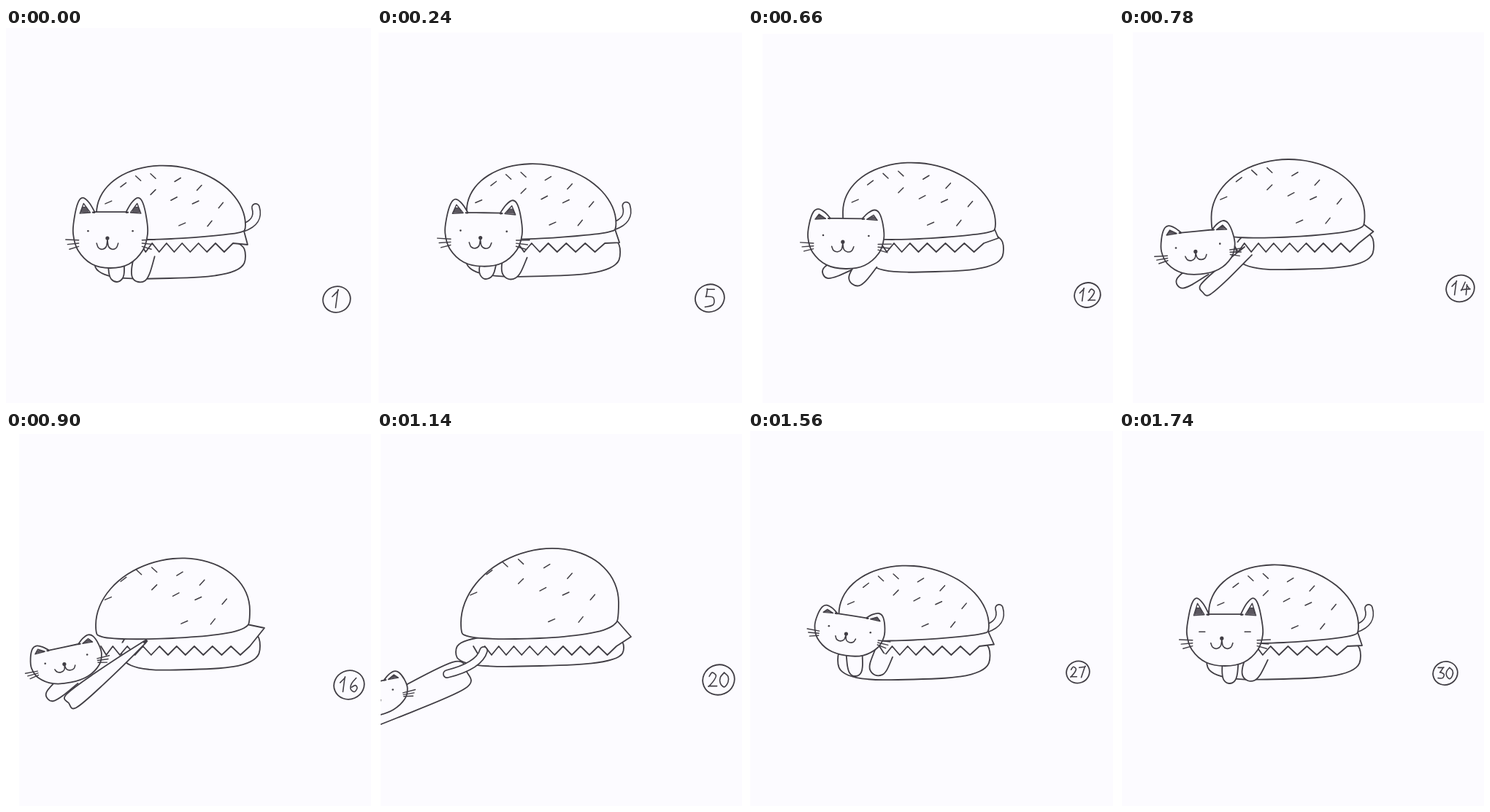
Write an HTML page with a canvas that moves like this. It is 500 px wide and 514 px high and loops after 1800 ms.

```html
<!DOCTYPE html>
<html lang="en">
<head>
<meta charset="utf-8">
<title>Cat burger</title>
<style>
html, body { margin: 0; width: 100%; height: 100%; overflow: hidden; background: #fff; }
canvas { display: block; width: 500px; height: 514px; }
</style>
</head>
<body>
<canvas id="stage" width="500" height="514"></canvas>
<script>
const ctx = document.getElementById('stage').getContext('2d');
const INK = '#413e45', PAPER = '#fcfbff', STEP = 60, COUNT = 30;
const LEAP = 20, RETURN = 24;

// bun: left, right, middle y, dome height, tilt, bottom y
// base: left, right, top, bottom    lettuce: left x, tip x, tip y
// head: x, y, half width, half height, tilt, ear height
// paw: end    arm: start, end, start width    badge: x, y, radius    paper: left, top
const poses = [
  { at: 1, bun: [124, 328, 262, 73, 8, 289], base: [121, 328, 288, 343], lettuce: [184, 331, 297],
    head: [143, 290, 51, 39, 0, 1.47], paw: [152, 348], arm: [190, 310, 181, 348, 14],
    tail: [1], badge: [453, 372, 19], paper: [0, 0] },
  { at: 8, bun: [122, 327, 257, 72, 9, 288], base: [122, 337, 275, 338], lettuce: [200, 333, 292],
    head: [148, 289, 54, 36, 2, 1.43], paw: [145, 341], arm: [190, 310, 179, 341, 18],
    tail: [1], badge: [458, 369, 21], paper: [4, 11] },
  { at: 12, bun: [130, 339, 260, 75, 8, 289], base: [163, 350, 278, 334], lettuce: [182, 343, 288],
    head: [134, 295, 52, 35, 1, 1.32], paw: [103, 338], arm: [166, 320, 143, 351, 13],
    tail: [0], badge: [465, 366, 18], paper: [20, 8] },
  { at: 16, bun: [123, 334, 256, 81, -10, 284], base: [158, 348, 268, 327], lettuce: [130, 354, 270],
    head: [84, 320, 49, 25, -12, 1.35], paw: [57, 367], arm: [188, 291, 86, 373, 2],
    tail: [0], badge: [470, 348, 21], paper: [18, 4] },
  { at: LEAP, bun: [115, 331, 249, 87, -14, 284], base: [108, 338, 278, 322], lettuce: [132, 348, 282],
    head: [-6, 368, 50, 23, -13, 1.35], paw: [-36, 425], arm: [112, 335, -40, 406, 20],
    tail: [0], badge: [468, 341, 22], paper: [5, 4] },
  { at: RETURN, bun: [126, 332, 260, 74, 7, 283], base: [126, 332, 280, 341], lettuce: [172, 341, 291],
    head: [131, 274, 44, 20, 18, 1], paw: [144, 326], arm: [182, 302, 172, 327, 11],
    tail: [1], badge: [457, 329, 15], paper: [2, 0] },
  { at: COUNT, bun: [123, 328, 258, 74, 9, 290], base: [120, 331, 282, 340], lettuce: [188, 333, 294],
    head: [145, 286, 52, 36, 0, 1.58], paw: [151, 346], arm: [190, 308, 176, 342, 15],
    tail: [1], badge: [447, 332, 17], paper: [4, 0] }
];

// Seeds in bun units: across from -1 to 1, down from 0 to 1.
const seeds = parse('-.64,.26 -.44,.17 -.24,.14 .09,.19 -.24,.36 .04,.45 .38,.3 .33,.5 .67,.54 .15,.8 .52,.79 -.84,.5');

// Handwritten digits in a box about 10 wide and 15 high.
const digits = [
  '5,0 1,5 1,11 5,15 9,10 9,4 5,0', '1,5 6,0 6,0 4,15', '1,4 4,0 8,3 6,8 1,14 1,14 9,14',
  '1,0 8,0 8,0 4,6 4,6 9,9 7,14 1,14', '5,0 1,9 1,9 10,8 10,8 7,4 7,4 6,15',
  '9,0 3,0 3,0 2,6 2,6 8,7 8,13 1,15', '7,0 2,6 1,12 5,15 8,11 6,8 2,10', '1,1 9,0 9,0 4,15',
  '5,7 2,4 4,0 8,2 7,6 2,10 3,15 7,15 8,11 5,7', '8,4 5,0 1,3 3,7 8,4 8,4 6,15'
].map(parse);

function parse(text) { return text.split(' ').map(p => p.split(',').map(Number)); }
function lerp(a, b, k) { return a + (b - a) * k; }
function range(n, fn) { return Array.from({ length: n }, (_, i) => fn(i)); }
function power(v, e) { return Math.sign(v) * Math.abs(v) ** e; }

function poseAt(n) {
  const i = poses.findLastIndex(p => p.at <= n);
  const a = poses[i], b = poses[i + 1] || a;
  const k = (n - a.at) / (b.at - a.at || 1), out = {};
  for (const key in a) if (key !== 'at') out[key] = a[key].map((v, j) => lerp(v, b[key][j], k));
  return out;
}

function ink(fill, width) {
  if (fill) { ctx.fillStyle = fill; ctx.fill(); }
  ctx.strokeStyle = INK;
  ctx.lineWidth = width;
  ctx.stroke();
}

function lines(pts, fill, width = 1.8) {
  ctx.beginPath();
  pts.forEach(p => ctx.lineTo(...p));
  ink(fill, width);
}

// A smooth curve through the points; a doubled point makes a corner.
function curve(pts, { closed = false, fill = '', width = 1.8 } = {}) {
  const n = pts.length;
  const at = i => pts[closed ? (i + n) % n : Math.max(0, Math.min(n - 1, i))];
  ctx.beginPath();
  ctx.moveTo(...pts[0]);
  for (let i = 0; i < (closed ? n : n - 1); i++) {
    const [p, q, r, s] = range(4, j => at(i + j - 1));
    ctx.bezierCurveTo(q[0] + (r[0] - p[0]) / 6, q[1] + (r[1] - p[1]) / 6,
      r[0] - (s[0] - q[0]) / 6, r[1] - (s[1] - q[1]) / 6, r[0], r[1]);
  }
  ink(fill, width);
}

function shifted(dx, dy, draw) {
  ctx.save();
  ctx.translate(dx, dy);
  draw();
  ctx.restore();
}

function dot([x, y], r) {
  ctx.beginPath();
  ctx.arc(x, y, r, 0, 7);
  ctx.fillStyle = INK;
  ctx.fill();
}

function drawTail(...path) {
  ctx.beginPath();
  ctx.moveTo(path[0], path[1]);
  ctx.quadraticCurveTo(...path.slice(2));
  ink('', 12);
  ctx.strokeStyle = PAPER;
  ctx.lineWidth = 8.6;
  ctx.stroke();
}

function drawBase([l, r, top, bottom]) {
  const cx = (l + r) / 2, cy = (top + bottom) / 2;
  curve(range(28, i => {
    const a = i / 28 * 2 * Math.PI, u = power(Math.cos(a), .6);
    return [cx + u * (r - l) / 2, cy + power(Math.sin(a), .7) * (bottom - top) / 2 - u * 3];
  }), { closed: true, fill: PAPER });
}

function drawLettuce([x, tipX, tipY], [, r, mid]) {
  const end = tipX - 20, teeth = Math.round((end - x) / 23);
  const zigzag = range(teeth * 2 + 1, i =>
    [lerp(x, end, (i / teeth / 2) ** 1.15), i % 2 ? 307 : 295]);
  lines([...zigzag, [tipX, tipY], [r - 4, mid + 9]], PAPER);
}

function drawBun([l, r, mid, h, tilt, bottom]) {
  const cx = (l + r) / 2, half = (r - l) / 2;
  curve(range(40, i => {
    const a = Math.PI + i / 40 * 2 * Math.PI, u = Math.cos(a), s = Math.sin(a);
    const side = mid + tilt * u;
    return [cx + u * half, s < 0 ? side + h * s : lerp(side, bottom - 5 * u, s ** .35)];
  }), { closed: true, fill: PAPER });

  const top = mid - h;
  seeds.forEach(([u, v], i) => {
    const leansRight = u < -.2 && v < .2;
    const a = leansRight ? .75 : -.65 + .25 * Math.sin(i * 3);
    const x = cx + u * half, y = lerp(top, bottom, v), dx = 4.8 * Math.cos(a), dy = 4.8 * Math.sin(a);
    lines([[x - dx, y - dy], [x + dx, y + dy]], '', 1.5);
  });
}

// A tapering limb with a round end; a whole one is round at both ends.
function drawLimb(x0, y0, x1, y1, w0, w1, whole) {
  const a = Math.atan2(y1 - y0, x1 - x0), c = Math.cos(a), s = Math.sin(a);
  const len = Math.hypot(x1 - x0, y1 - y0);
  const at = (along, side) => [x0 + c * along - s * side, y0 + s * along + c * side];
  const pts = [at(0, w0), at(len * .6, lerp(w0, w1, .6)), at(len - 4, w1 * .75), at(len, 0),
    at(len - 4, -w1 * .75), at(len * .6, -lerp(w0, w1, .6)), at(0, -w0)];
  if (whole) pts.push(at(-w0 * .6, 0));
  curve(pts, { closed: whole, fill: PAPER });
}

function drawHead([cx, cy, w, h, tilt, ear], n) {
  const a = tilt * Math.PI / 180, c = Math.cos(a), s = Math.sin(a);
  const put = ([x, y]) => [cx + x * w * c - y * h * s, cy + x * w * s + y * h * c];
  const mirror = pts => pts.map(([x, y]) => [-x, y]).reverse();
  const slope = lerp(.97, ear, .65);
  const half = [[0, 1], [.5, .86], [.87, .38], [1, -.2], [.97, -.75], [.87, -slope],
    [.74, -ear], [.57, -slope], [.42, -.97], [.42, -.97]];
  curve([...half, ...mirror(half.slice(1))].map(put), { closed: true, fill: PAPER });

  const smile = Math.max(0, 1 - Math.abs(n - 8) / 3);
  const turnedAway = n >= RETURN && n < RETURN + 2;
  for (const side of [-1, 1]) {
    const stroke = (pts, width, fill = '') => lines(pts.map(([x, y]) => put([x * side, y])), fill, width);
    range(3, i => stroke([[1.2 - i * .05, i * .17 - smile * .5], [.85, .02 + i * .11 - smile * .4]], 1.4));
    if (turnedAway) continue;

    const tip = .2 - ear;
    stroke([[.82, -.92], [.72, tip], [.54, -.95], [.82, -.92]], 1.4);
    stroke([[.79, -.95], [.75, lerp(-.95, tip, .6)], [.65, lerp(-.95, tip, .6)], [.58, -.95]], 1, '#5b575f');

    const [x, y] = put([side * .6, -.3]);
    if (smile) curve([[x - 7, y + 2], [x, y - 3], [x + 7, y + 2]], { width: 1.5 });
    else if (n > 27) lines([[x - 4, y], [x + 4, y]], '', 1.5);
    else dot([x, y], 1.3);
  }
  if (turnedAway) return;

  const nose = pts => pts.map(([x, y]) => put([x - .08, y]));
  if (smile) {
    const deep = lerp(.3, .92, smile), lip = [[.13, .2], [.13, deep - .2], [.07, deep]];
    curve(nose([...lip, ...mirror(lip)]), { fill: PAPER });
  }
  const mouth = [[0, 0], [.03, .24], [.13, .34], [.24, .29], [.29, .13]];
  curve(nose([...mirror(mouth), ...mouth]), { width: 1.6 });
  dot(nose([[0, -.05]])[0], 2.6);
}

function drawCat({ head, paw, arm }, n) {
  const [x, y, w, h] = head;
  const stretched = n >= 16 && n <= LEAP;
  drawLimb(x + w * .15, y + h * .7, ...paw, 11, 10, false);
  drawLimb(...arm, stretched ? 15 : 12, stretched);
  drawHead(head, n);
}

function drawBadge([x, y, r], n) {
  ctx.beginPath();
  ctx.ellipse(x, y, r, r * .93, -.4, 0, 7);
  ink('', 1.8);
  const text = String(n), h = r * (text.length > 1 ? .9 : 1.2), s = h / 15;
  [...text].forEach((d, i) => {
    const left = x - 5 * s + (i - (text.length - 1) / 2) * 11.5 * s;
    curve(digits[d].map(([u, v]) => [left + u * s, y - h / 2 + v * s]), { width: 1.6 });
  });
}

function smudge(x, y, rx, ry, turn, alpha) {
  ctx.save();
  ctx.translate(x, y);
  ctx.rotate(turn);
  ctx.scale(rx, ry);
  const g = ctx.createRadialGradient(0, 0, 0, 0, 0, 1);
  g.addColorStop(0, `rgba(120,118,128,${alpha})`);
  g.addColorStop(1, 'rgba(120,118,128,0)');
  ctx.fillStyle = g;
  ctx.fillRect(-1, -1, 2, 2);
  ctx.restore();
}

function drawFrame(n) {
  const p = poseAt(n), leaving = n >= LEAP && n <= RETURN;
  ctx.fillStyle = '#fff';
  ctx.fillRect(0, 0, 500, 514);
  ctx.save();
  ctx.beginPath();
  ctx.rect(...p.paper, 500, 514);
  ctx.clip();
  ctx.fillStyle = PAPER;
  ctx.fillRect(0, 0, 500, 514);
  ctx.lineJoin = ctx.lineCap = 'round';
  if (n === RETURN) {
    smudge(375, 320, 24, 14, -.1, .2);
    smudge(414, 435, 35, 17, .9, .38);
    smudge(357, 457, 11, 19, .2, .4);
  }

  const [, right, mid, , tilt] = p.bun, size = p.tail[0], tailY = mid + tilt + 4;
  if (size) drawTail(right - 4, tailY, right + 20 * size, tailY - 8 * size, right + 14 * size, tailY - 28 * size);
  drawBase(p.base);
  // The next cat comes out from behind the bun while the first one leaves.
  if (n > LEAP && n < RETURN) shifted((RETURN - n) * 16, 0, () => drawCat(poseAt(RETURN), RETURN));
  drawLettuce(p.lettuce, p.bun);
  drawBun(p.bun);
  if (n < LEAP || n >= RETURN) drawCat(p, n);
  if (leaving) shifted((n - LEAP) * -33.5, (n - LEAP) * 18, () => {
    drawCat(poseAt(LEAP), LEAP);
    drawTail(96, 333, 140, 322, 146, 301);
  });
  drawBadge(p.badge, n);
  ctx.restore();
}

const start = performance.now();
let shown = 0;
function tick() {
  const n = Math.floor((performance.now() - start) / STEP) % COUNT + 1;
  if (n !== shown) drawFrame(shown = n);
  requestAnimationFrame(tick);
}
tick();
</script>
</body>
</html>
```
